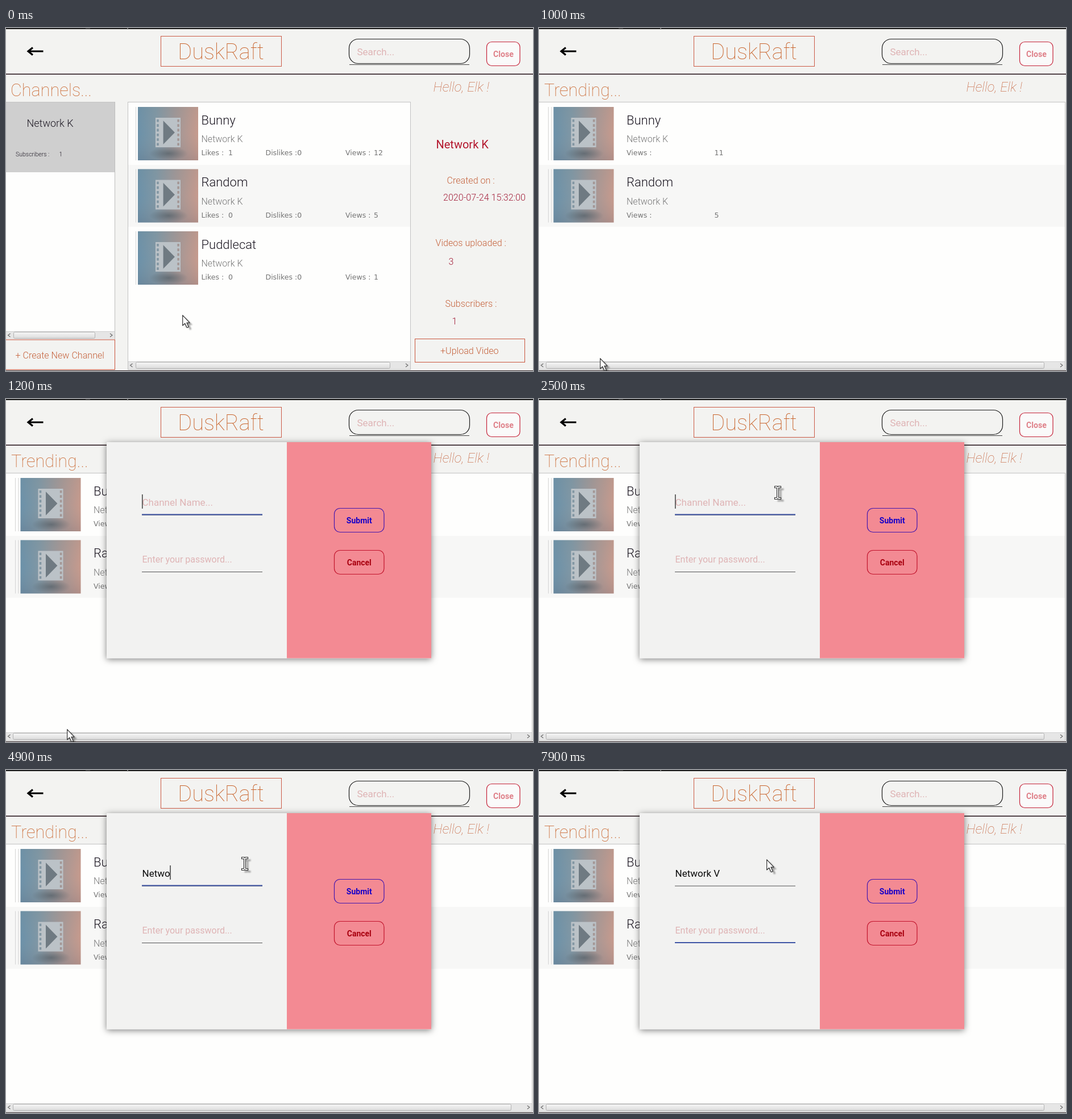
These frames come from a looping animation (927x604 px, 8000 ms). An HTML page:

```html
<!DOCTYPE html>
<html lang="en">
<head>
<meta charset="utf-8">
<title>Video channels</title>
<style>
html, body { margin: 0; width: 100%; height: 100%; overflow: hidden; background: #f3f3f1; }
svg { display: block; }
text { font-family: Roboto, "Open Sans", sans-serif; font-weight: 300; white-space: pre; }
.dv { font-family: "DejaVu Sans", sans-serif; font-weight: 400; }
.thin { font-weight: 100; }
.reg { font-weight: 400; }
.bold { font-weight: 700; }
</style>
</head>
<body>
<svg id="stage" width="927" height="604" viewBox="0 0 927 604"></svg>
<script>
const LOOP = 8000;
const ORANGE = '#c5623c', RED = '#b3152c', WINE = '#a31f3a', INK = '#1d1823', HINT = '#dfb4b5';
const OWNER = 'Network K', TYPED = 'Network V';

const rect = (x, y, w, h, fill, extra = '') =>
  `<rect x="${x}" y="${y}" width="${w}" height="${h}" fill="${fill}" ${extra}/>`;
const box = (x, y, w, h, stroke, r = 0, fill = 'none', width = 1) =>
  rect(x, y, w, h, fill, `rx="${r}" stroke="${stroke}" stroke-width="${width}"`);
const path = (d, extra) => `<path d="${d}" ${extra}/>`;
const text = (x, y, size, fill, str, cls = '', extra = '') =>
  `<text x="${x}" y="${y}" font-size="${size}" ${fill ? `fill="${fill}"` : ''} class="${cls}" ${extra}>${str}</text>`;
const group = (id, body) => `<g id="${id}">${body}</g>`;

// Film strip with sprocket holes and a play triangle cut out.
function filmPath() {
  let d = 'M31 19h44v52h-44z M44.5 24v42l20.5 -21z';
  for (let i = 0; i < 6; i++)
    for (const x of [33.2, 69.3]) d += `M${x} ${22 + i * 8.3}h3.6v4.6h-3.6z`;
  return d;
}

const defs = `<defs>
  <linearGradient id="tint">
    <stop offset="0" stop-color="#6b91a9"/><stop offset=".3" stop-color="#7f97a5"/>
    <stop offset=".65" stop-color="#a39796"/><stop offset="1" stop-color="#c69a8d"/>
  </linearGradient>
  <linearGradient id="shade" x2="0" y2="1">
    <stop offset="0" stop-color="#788" stop-opacity=".12"/><stop offset=".5" stop-color="#999" stop-opacity="0"/>
    <stop offset="1" stop-color="#556" stop-opacity=".18"/>
  </linearGradient>
  <radialGradient id="spot">
    <stop offset="0" stop-color="#3c4a52" stop-opacity=".5"/><stop offset="1" stop-color="#3c4a52" stop-opacity="0"/>
  </radialGradient>
  <linearGradient id="thumb" x2="0" y2="1">
    <stop offset="0" stop-color="#f6f6f6"/><stop offset="1" stop-color="#dcdcdc"/>
  </linearGradient>
  <filter id="drop" x="-10%" y="-10%" width="120%" height="120%">
    <feDropShadow dx="0" dy="2" stdDeviation="6" flood-color="#000" flood-opacity=".5"/>
  </filter>
  <filter id="soft" x="-50%" y="-50%" width="200%" height="200%"><feGaussianBlur stdDeviation=".8"/></filter>
  <g id="clip">
    ${rect(-4, 0, 1, 94, '#d4d4d4')}${rect(0, 0, 106, 94, 'url(#tint)')}${rect(0, 0, 106, 94, 'url(#shade)')}
    <ellipse cx="54" cy="82" rx="34" ry="12" fill="url(#spot)"/>
    ${path('M44.5 24v42l20.5 -21z', 'fill="#6f7a82"')}
    ${path(filmPath(), 'fill="#bbc2c7" fill-rule="evenodd"')}
  </g>
</defs>`;

function scrollbar(x, y, w, thumbX, thumbW) {
  const mid = y + 7, end = x + w;
  const arrows = `M${x + 7.5} ${mid - 3}l-4 3l4 3M${end - 8} ${mid - 3}l4 3l-4 3`;
  return rect(x, y, w, 14, '#e6e6e6') + rect(x, y, w, 1, '#d0d0d0') +
    box(thumbX + .5, y + 1.5, thumbW, 11, '#b2b2b2', 2, 'url(#thumb)') +
    path(arrows, 'fill="none" stroke="#666" stroke-width="1.1"');
}

const header = rect(0, 0, 927, 2, '#1c1c1c') + rect(140, 0, 8, 1, '#555') + rect(213, 0, 2, 1, '#bbb') +
  path('M39 41H65.5M47 34.5L39 41L47 47.5', 'fill="none" stroke="#000" stroke-width="3.2"') +
  box(272.5, 14.5, 212, 53, '#cb5a45') +
  text(378, 55, 38, '#c9662f', 'DuskRaft', 'thin', 'text-anchor="middle"') +
  box(603.5, 19.5, 212, 43, '#1d1d1d', 16, 'none', 1.2) + rect(604, 64, 211, 1, '#444') +
  text(617.5, 48, 17, HINT, 'Search...', 'reg') +
  box(845.5, 24.5, 58.5, 42, '#c52239', 9, '#fafafa', 1.2) +
  text(875, 50.5, 14.1, '#df8089', 'Close', 'bold', 'text-anchor="middle"') +
  rect(0, 80, 927, 1, '#8a7f82') + rect(0, 81, 927, 1, '#1f0d14') +
  text(751.5, 112, 23.7, ORANGE, 'Hello, Elk !', 'thin', 'font-style="italic"');

function videoRow(i, title, likes, views) {
  const y = i * 109.5, small = (x, s) => text(x, 224 + y, 12.5, '#747474', s, 'dv');
  return `<use href="#clip" x="232" y="${139 + y}"/>` +
    text(343.5, 169.5 + y, 22, INK, title) + text(343.5, 201 + y, 16, '#777', OWNER) +
    small(343.5, 'Likes :') + small(391, likes) + small(456.5, 'Dislikes :0') +
    small(597, 'Views :') + small(647, views);
}

const sidebar = rect(0, 130, 192, 418, '#fefefd') + rect(0, 130, 192, 1, '#c4c4c4') +
  rect(191, 130, 1, 418, '#bdbdbd') +
  '<rect id="item" y="131" width="191" height="123"/>' +
  group('itemText', text(36.5, 174, 18, '', OWNER) +
    text(17, 225.5, 10.5, '', 'Subscribers :') + text(93.5, 225.5, 10.5, '', '1')) +
  scrollbar(0, 534, 191, 13, 143) +
  box(-1, 549, 192.5, 52.5, '#c9553c') + text(16.5, 581.5, 16.1, ORANGE, '+ Create New Channel') +
  group('focusRing', box(1.5, 132.5, 188, 120, '#3cb5d3') + box(-2, 130.5, 194, 418, '#1ba0c2', 0, 'none', 1.6));

const details = [
  [756.5, 211.5, 20, RED, OWNER, 'reg'],
  [775.5, 274, 16.1, ORANGE, 'Created on :'],
  [769, 303.5, 16.1, WINE, '2020-07-24 15:32:00'],
  [755.5, 383.5, 16.1, ORANGE, 'Videos uploaded :'],
  [778.5, 416.5, 16.1, WINE, '3'],
  [772.5, 491, 16.1, ORANGE, 'Subscribers :'],
  [784.5, 522, 16.1, WINE, '1'],
  [764, 574, 16.1, ORANGE, '+Upload Video']
].map(row => text(...row)).join('') + box(719.5, 547.5, 193, 41, '#c9553c');

const channelPage = text(8, 120, 30.6, '#c9662f', 'Channels...', 'thin') + sidebar +
  box(214.5, 130.5, 497, 471, '#c2c2c2', 0, '#fefefd') + rect(215, 241, 496, 109, '#f7f7f6') +
  videoRow(0, 'Bunny', '1', '12') + videoRow(1, 'Random', '0', '5') + videoRow(2, 'Puddlecat', '0', '1') +
  scrollbar(215, 587, 496, 228, 447) + details;

function trendingRow(i, title, views) {
  const y = i * 109.5;
  return `<use href="#clip" x="25.5" y="${139 + y}"/>` + rect(16, 139 + y, 1, 94, '#d4d4d4') +
    text(154, 169.5 + y, 22, INK, title) + text(154, 201 + y, 16, '#777', OWNER) +
    text(154, 224 + y, 12.5, '#747474', 'Views :', 'dv') + text(308.5, 224 + y, 12.5, '#747474', views, 'dv');
}

const trendingPage = text(9, 120, 30.6, '#c9662f', 'Trending...', 'thin') +
  box(-1, 130.5, 926.5, 471, '#c2c2c2', 0, '#fefefd') + rect(0, 241, 925, 109, '#f7f7f6') +
  trendingRow(0, 'Bunny', '11') + trendingRow(1, 'Random', '5') +
  scrollbar(0, 587, 925, 12, 876);

const button = (y, color, ink, label) => box(577.5, y, 87.5, 42, color, 10, 'none', 1.2) +
  text(621.3, y + 26.5, 14, ink, label, 'bold', 'text-anchor="middle"');

const dialog = `<g filter="url(#drop)">${rect(177, 76, 571, 380.5, '#f2f2f1')}</g>` +
  rect(494, 76, 254, 380.5, '#f38a93') +
  button(192.5, '#4417ae', '#1600c8', 'Submit') + button(266.5, '#c2152d', '#a8000f', 'Cancel') +
  rect(239, 203.7, 212, 1, '#555') + rect(239, 304, 212, 1, '#555') +
  '<rect id="line" height="2" fill="#3f55a5"/>' +
  text(239.5, 187.5, 17, HINT, 'Channel Name...', 'reg', 'id="hint"') +
  text(239.5, 187.5, 17, '#0a0a0a', '', 'reg', 'id="entry"') +
  text(239.5, 287.5, 16, HINT, 'Enter your password...', 'reg') +
  '<rect id="caret" width="1.3" height="25" fill="#222"/>';

const ARROW = 'M.7 .8V19L4.8 15.2L8.4 22.8L11.4 21.4L7.9 14.1H13.2Z';
const BEAM = 'M-5.5 -11.5H-1L0 -10.5L1 -11.5H5.5V-8.5H1.5V8.5H5.5V11.5H1L0 10.5L-1 11.5H-5.5V8.5H-1.5V-8.5H-5.5Z';
const pointer = (id, d) => group(id,
  path(d, 'transform="translate(5 4)" fill="#000" opacity=".34" filter="url(#soft)"') +
  path(d, 'fill="#fff" stroke="#333" stroke-width="1.2" stroke-linejoin="round"'));

const stage = document.getElementById('stage');
stage.innerHTML = defs + rect(0, 0, 927, 604, '#f3f3f1') + header +
  group('channels', channelPage) + group('trending', trendingPage) +
  rect(0, 603, 927, 1, '#2a2024') + group('dialog', dialog) +
  pointer('arrow', ARROW) + pointer('beam', BEAM);

const el = {};
stage.querySelectorAll('[id]').forEach(node => el[node.id] = node);

// Each row: start time, then the values held until the next row.
const CURSOR = [
  [0, 'arrow', 310, 505], [100, 'arrow', 298, 536], [200, 'arrow', 273, 576],
  [600, 'arrow', 190, 583], [700, 'arrow', 107, 581], [1300, 'arrow', 235, 512],
  [1400, 'arrow', 392, 391], [1500, 'arrow', 425, 285], [1600, 'beam', 424, 195],
  [1700, 'beam', 420, 165], [6600, 'beam', 402, 214], [6700, 'beam', 371, 268],
  [6900, 'beam', 366, 271], [7400, 'beam', 358, 260], [7700, 'arrow', 400, 157]
];
const LETTERS = [[0, 0], [4200, 1], [4600, 3], [4800, 4], [4900, 5], [5300, 7], [5500, 8], [5800, 9]];
const CARET = [
  [0, 1], [1600, 0], [2500, 1], [2600, 0], [3500, 1], [6300, 0], [6900, 1],
  [7000, 0], [7300, 1], [7900, 0]
];
const at = (rows, t) => rows.filter(row => row[0] <= t).pop();
const show = (node, on) => node.setAttribute('display', on ? 'inline' : 'none');
const set = (node, attrs) => Object.entries(attrs).forEach(([k, v]) => node.setAttribute(k, v));

function draw(t) {
  const focused = t >= 800;
  show(el.channels, t < 1000);
  show(el.trending, t >= 1000);
  show(el.focusRing, focused);
  el.item.setAttribute('fill', focused ? '#0d9fc3' : '#cfcfcf');
  el.itemText.setAttribute('fill', focused ? '#fff' : INK);

  show(el.dialog, t >= 1100);
  el.dialog.setAttribute('transform', t < 1200 ? 'translate(-634.5 -211)' : '');
  const typed = TYPED.slice(0, at(LETTERS, t)[1]);
  if (el.entry.textContent !== typed) el.entry.textContent = typed;
  show(el.hint, !typed);

  const second = t >= 7300;
  const grow = second ? Math.min(1, (t - 7300 + 60) / 220) : 1;
  set(el.line, { x: 345 - 106 * grow, y: second ? 303 : 202.5, width: 212 * grow });
  const advance = typed && !second ? el.entry.getComputedTextLength() : 0;
  set(el.caret, { x: 239.2 + advance, y: second ? 269 : 168 });
  show(el.caret, at(CARET, t)[1]);

  const [, kind, x, y] = at(CURSOR, t);
  show(el.arrow, kind === 'arrow');
  show(el.beam, kind === 'beam');
  el[kind].setAttribute('transform', `translate(${x} ${y})`);
}

const start = performance.now();
function tick() {
  draw((performance.now() - start) % LOOP);
  requestAnimationFrame(tick);
}
tick();
</script>
</body>
</html>
```
